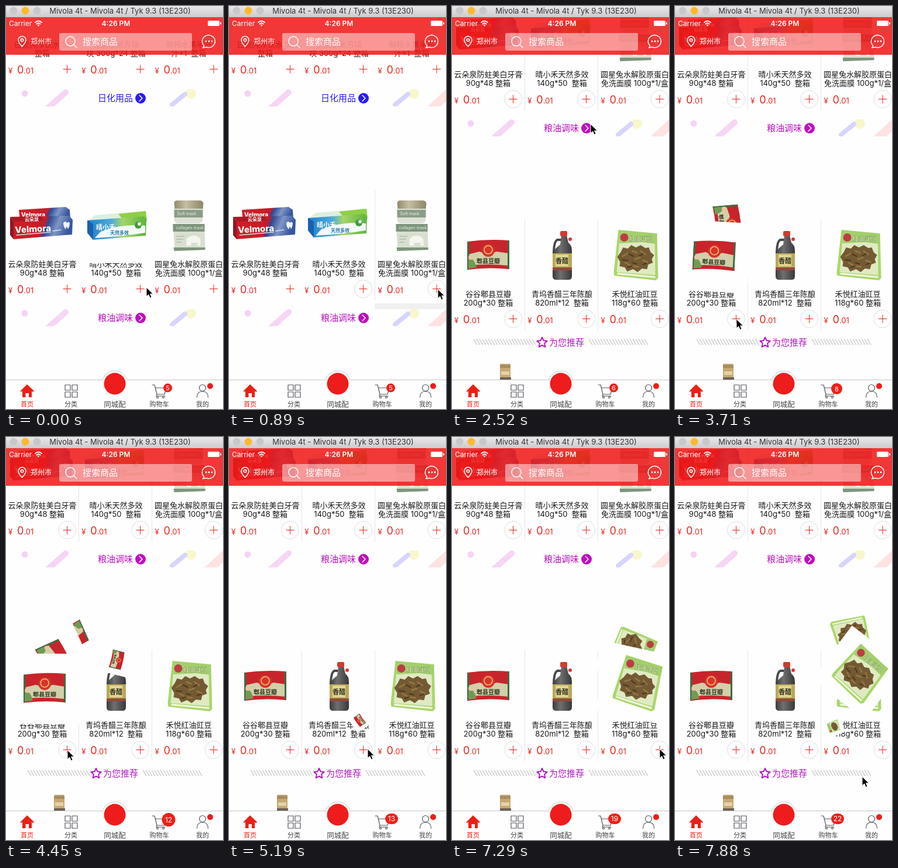
Recreate the animation shown at these times as an HTML page. Size 371 by 686 pixels, loop 8000 ms.

```html
<!DOCTYPE html>
<html lang="zh">
<head>
<meta charset="utf-8">
<title>Shop cart</title>
<style>
html, body { margin: 0; width: 100%; height: 100%; overflow: hidden; background: #fff; }
svg { display: block; width: 371px; height: 686px; }
text { font-family: Inter, "Noto Sans CJK SC", "Noto Sans CJK", sans-serif; white-space: pre; }
.line { fill: none; stroke-linecap: round; stroke-linejoin: round; }
</style>
</head>
<body>
<svg viewBox="0 0 371 686">
  <defs>
    <linearGradient id="bar" x2="0" y2="1"><stop stop-color="#e9e7e9"/><stop offset="1" stop-color="#cdcbcd"/></linearGradient>
    <linearGradient id="paste" x2="1" y2=".15"><stop stop-color="#d01f28"/><stop offset=".58" stop-color="#c41d28"/><stop offset=".64" stop-color="#2c4a94"/><stop offset=".8" stop-color="#7f95c4"/><stop offset="1" stop-color="#37569e"/></linearGradient>
    <linearGradient id="herb" x2="1"><stop stop-color="#1f7fc8"/><stop offset=".4" stop-color="#4aa9dc"/><stop offset=".6" stop-color="#a5d66a"/><stop offset="1" stop-color="#5cb23f"/></linearGradient>
    <linearGradient id="lid" x2="1"><stop stop-color="#8f8a6c"/><stop offset=".4" stop-color="#c4bfa2"/><stop offset="1" stop-color="#8b8667"/></linearGradient>
    <linearGradient id="glass" x2="1"><stop stop-color="#3b3b3d"/><stop offset=".4" stop-color="#706f70"/><stop offset="1" stop-color="#39373a"/></linearGradient>

    <g id="p0">
      <path fill="url(#paste)" d="M-40-27 40-32 47-27 48-12-38-8z"/>
      <text x="-36" y="-15" font-size="10" font-weight="800" fill="#fff">Velmora</text>
      <path fill="#8e1826" d="M-55-15-49-7-49 23-55 16z"/>
      <path fill="url(#paste)" d="M-55-15 46-17 52-10 51 15-49 23-49-7z"/>
      <path fill="#7d1420" d="M-55-15-2-16 2-9-49-7z" opacity=".45"/>
      <text x="-30" y="-8" font-size="8" font-weight="700" fill="#fff">云朵泉</text>
      <text x="-47" y="10" font-size="15" font-weight="800" fill="#fff" transform="rotate(-3)">Velmora</text>
      <path class="line" stroke="#d9deec" stroke-width="1.500" d="M-44 16 14 11M18 9l14-2"/>
      <path fill="#eef4fb" d="M36-5q4-4 6 0 4-3 5 1 0 5-3 10l-2-5-2 5q-4-4-4-11z"/>
    </g>
    <g id="p1">
      <path fill="#dcefe0" d="M-40-22 46-29 48-17-52-12z"/>
      <path fill="#8fcf45" d="M0-24 47-29 49-12 10-12z"/>
      <path fill="url(#herb)" d="M-53-13 44-20 48-15 47 13-43 20-53 8z"/>
      <path fill="#1c60ad" d="M-53-13-43-7-43 20-53 8z"/>
      <path fill="#f4faf6" d="M-30 6Q8-8 46-4L46 8Q10 14-40 17-36 12-30 6z"/>
      <text x="-38" y="3" font-size="11" font-weight="800" fill="#fff">晴小禾</text>
      <text x="-14" y="11" font-size="8" font-weight="700" fill="#2775bb">天然多效</text>
      <circle cx="34" cy="-5" r="6" fill="#3f9b3a"/><circle cx="36" cy="-7" r="3" fill="#e8f6dc"/>
    </g>
    <g id="p2">
      <path fill="url(#lid)" d="M-25-38q0-5 6-5h37q6 0 7 5l-1 9h-48z"/>
      <path fill="#dde1d3" d="M-25-29h49v19q-2 6-8 6h-34q-6 0-7-6z"/>
      <path fill="#8a9d88" d="M-25-27h49v13h-49z"/>
      <text x="-20" y="-18" font-size="7" fill="#eef1e6">Soft mask</text>
      <path fill="#d8dfd0" d="M-27-3h54l1 44-52 2z"/>
      <path fill="#7d957c" d="M-27-3h54v13h-54zM-26 37h54v4l-53 2z"/>
      <text x="-22" y="6" font-size="7" fill="#e8eee0">collagen mask</text>
      <path fill="#f4f6ee" d="M-4 34V23q4-7 14-6 9 1 10 8v9h-5v-5H4v5z"/>
      <path class="line" stroke="#9cab98" d="M-21 18h13M-21 23h11M-21 28h8"/>
    </g>
    <g id="p3">
      <path fill="#c8242c" d="M-36-24Q0-29 35-26L36 23Q0 19-36 24z"/>
      <path fill="#d2cfaa" d="M-35-2-15-7Q0 0 14-7L35-4 35 17Q0 13-35 17z"/>
      <path fill="#3d6d42" d="M-36-24-33-24-32 23-36 24zM33-26 36-26 36 23 33 22z"/>
      <circle cy="-9" r="11" fill="#d6352d"/><circle cy="-10" r="7" fill="none" stroke="#efca6a" stroke-width="1.500"/>
      <text y="13" font-size="10" font-weight="700" text-anchor="middle" fill="#30381f">郫县豆瓣</text>
      <path fill="#6f9b55" d="M-34 6q8-3 12 8l2 6-14 2z"/>
      <circle cx="-30" cy="3" r="4" fill="#e9c4a0"/>
    </g>
    <g id="p4">
      <path class="line" stroke="#4a484a" stroke-width="4" d="M-1-27h-7q-6 3-6 24"/>
      <path fill="url(#glass)" d="M-1-35h9l3 13q6 4 6 14v43q0 6-6 6h-21q-6 0-6-6V-6Q-10-14-3-19z"/>
      <rect x="-3" y="-42" width="12" height="9" rx="2" fill="#d33a31"/>
      <circle cx="14" cy="-28" r="3" fill="#d33a31"/>
      <path fill="#b9a958" d="M-16-4h33v29h-33z"/>
      <path fill="#8f4a3c" d="M-16 20h33v5h-33z"/>
      <path fill="#e2d690" d="M-11-2h22v20h-22z"/>
      <text y="13" font-size="11" font-weight="800" text-anchor="middle" fill="#292a20">香醋</text>
    </g>
    <g id="p5">
      <path fill="#a9d66a" d="M-28-44 38-38 40 38 36 42-35 34-36 28z"/>
      <path fill="#dfeac2" d="M-25-40 34-35 35 33-31 28z"/>
      <path fill="#a3cf6c" d="M-27-43 38-37 37-20 12-23-26-21z"/>
      <circle cx="-18" cy="-31" r="7" fill="#bd3d45"/>
      <text x="-9" y="-25" font-size="10" font-weight="700" fill="#f7f4d4" stroke="#416f2c" stroke-width=".3">红油豇豆</text>
      <path fill="#745a34" d="M-30 2-24-6-20-14-12-12-6-18 2-14 10-18 18-13 24-14 27-6 33-1 29 6 31 12 23 15 21 23 12 22 5 28-3 23-13 27-17 20-26 18-25 11z"/>
      <path class="line" stroke="#95793f" stroke-width="2.500" d="M-21 1l9-5M-4-8l8 3M10-8l8 6M-16 12l8 4M0 6l9-3M14 8l8 3M-2 18l8 1"/>
      <path class="line" stroke="#4a3920" stroke-width="2" d="M-22 7l10 1M-10-3l8 4M8 0l6-3M-4 12l7 2M14 15l6-2M-12 20l6-2"/>
      <path fill="#f3f5df" d="M-29 29 35 35 35 38-31 32z"/>
    </g>
  </defs>

  <rect width="371" height="686" fill="#fefefe"/>
  <g id="content"></g>

  <rect y="19" width="371" height="64" fill="#f01a1a" opacity=".87"/>
  <rect width="371" height="19" fill="url(#bar)"/>
  <circle cx="13" cy="8" r="6.500" fill="#c9c7c9"/><circle cx="33" cy="8" r="6.500" fill="#fdb92c"/><circle cx="53" cy="8" r="6.500" fill="#c9c7c9"/>
  <text x="195" y="13" font-size="13" text-anchor="middle" fill="#363436">Mivola 4t - Mivola 4t / Tyk 9.3 (13E230)</text>
  <g fill="#fff">
    <text x="5" y="33.500" font-size="12">Carrier</text>
    <text x="188" y="33.500" font-size="12" font-weight="600" text-anchor="middle">4:26 PM</text>
    <g class="line" stroke="#fff" stroke-width="1.800"><path d="M50 28q5.500-5 11 0M52.500 30.500q3-3 6 0"/></g>
    <circle cx="55.500" cy="33" r="1.400"/>
    <rect x="345" y="25" width="20" height="9" rx="1.500"/><rect x="366" y="27.500" width="2" height="4" rx="1"/>
    <rect x="91" y="46" width="227" height="30" rx="3" opacity=".48"/>
    <text x="42" y="65" font-size="12">郑州市</text>
    <text x="131" y="66" font-size="15">搜索商品</text>
  </g>
  <g class="line" stroke="#fff" stroke-width="1.500">
    <path d="M27.500 69q-6.500-7-6.500-11a6.500 6.500 0 0 1 13 0q0 4-6.500 11z"/><circle cx="27.500" cy="58" r="2.300"/>
    <circle cx="110" cy="60" r="8"/><path d="m116 66 5 5"/>
    <path d="M338.500 67.500a11 10.500 0 1 1 4 2.500l-6 1q2-1.500 2-3.500z"/>
  </g>
  <g fill="#fff"><circle cx="342" cy="60" r="1.500"/><circle cx="347" cy="60" r="1.500"/><circle cx="352" cy="60" r="1.500"/></g>

  <rect y="637" width="371" height="49" fill="#fefefe"/>
  <circle cx="186" cy="643" r="22" fill="#fefefe" stroke="#ccc"/>
  <rect x="160" y="637" width="52" height="30" fill="#fefefe"/>
  <path d="M0 636.500H165M207 636.500H371" stroke="#c4c4c4"/>
  <circle cx="186" cy="643" r="18.500" fill="#ee1c1c"/>
  <path fill="#ea2015" d="M36 644 48 655.500 46 657 44 655.500V666H39V659H33.500V666H28V655.500L26 657 24.500 655.500z"/>
  <g class="line" stroke="#555560" stroke-width="1.200">
    <path d="M101 645h9v9h-9zM113 645h9v9h-9zM101 657h9v9h-9zM113 657h9v9h-9z"/>
    <path d="M250 645h4l4 16h13l3-11h-18M258 661l-1 3h15"/><circle cx="259" cy="666" r="1.500"/><circle cx="269" cy="666" r="1.500"/>
    <circle cx="336" cy="650" r="5.500"/><path d="M326.500 666q0-10 9.500-10t9.500 10"/>
  </g>
  <circle cx="349" cy="647" r="5" fill="#ee1c1c"/>
  <g id="tabs"></g>
  <g id="badge"><rect fill="#ee2018"/><text y="4" text-anchor="middle" fill="#fff"></text></g>
  <g id="flights"></g>
  <path id="cursor" d="M0 0V15.500L3.700 12.200 6.300 18 9 16.800 6.500 11.200H11.500z" fill="#000" stroke="#fff"/>
</svg>
<script>
const $ = id => document.getElementById(id);
const LOOP = 8000, STEP = 148.5, SCROLL = 323, FLIGHT = 5;
const COLS = [62, 188, 312.5], PLUS = [104.5, 229.5, 355];
const CART = [262, 655];

const text = (x, y, str, size, fill = '#1a1a1a', anchor = 'middle') =>
  `<text x="${x}" y="${y + size * .36}" font-size="${size}" fill="${fill}" text-anchor="${anchor}">${str}</text>`;

// One row of three products, centred on its picture height
function row(y, names, first, cls) {
  return names.map(([a, b], c) => {
    const x = COLS[c], left = c * 125.3, py = y + 109, px = PLUS[c];
    return (first < 0 ? '' : `<use href="#p${first + c}" x="${x}" y="${y}"/>`) +
      text(x, y + 65, a, 13) + text(x, y + 80, b, 13) +
      `<text y="${py + 6}" fill="#e5261e"><tspan x="${left + 4}" font-size="13">¥</tspan><tspan x="${left + 19}" font-size="18">0</tspan><tspan font-size="13">.01</tspan></text>` +
      `<path d="M${px - 7} ${py - 1.5}h14m-7-7v14" stroke="#e5261e" fill="none"/>` +
      (first < 0 ? '' : `<circle class="${cls}${c}" cx="${px}" cy="${py - 1.5}" r="15" fill="none" stroke="#dedede"/>`) +
      (c && first >= 0 ? `<path class="${cls}${c}d" d="M${c * 125 - .5} ${y - 62}v189" stroke="#e6e6e6"/>` : '');
  }).join('');
}

function section(y, name, color) {
  return `<svg y="${y - 15}" width="371" height="29"><g fill="none">
    <circle cx="32" cy="7" r="5.5" fill="#f5d3f5"/>
    <path d="M69 34 102 5" stroke="#f6d5f5" stroke-width="10" stroke-linecap="round"/>
    <circle cx="316" cy="7" r="9" fill="#f8f7cc"/>
    <path d="M284 26 306 8" stroke="#d7d5fd" stroke-width="8" stroke-linecap="round"/>
    <path class="stripe" d="M345 34 379 3" stroke="#ffe2e2" stroke-width="15"/></g></svg>` +
    text(157, y, name, 15, color, 'start') +
    `<circle cx="230" cy="${y}" r="9" fill="${color}"/><path class="line" d="M228 ${y - 5}l5 5-5 5" stroke="#fff" stroke-width="1.5"/>`;
}

function hatch(from, to) {
  let d = '';
  for (let x = from; x < to - 5; x += 5) d += `M${x} 567l6 10`;
  return `<path d="${d}" stroke="#d2d2d2" stroke-width="1.6"/>`;
}

function star(x, y, r) {
  const pts = [...Array(10).keys()].map(i => {
    const a = (i / 5 - .5) * Math.PI, q = i % 2 ? r * .48 : r;
    return `${(x + q * Math.cos(a)).toFixed(1)},${(y + q * Math.sin(a)).toFixed(1)}`;
  });
  return `<polygon class="line" points="${pts.join(' ')}" stroke="#b01cc0" stroke-width="2"/>`;
}

$('content').innerHTML =
  row(-323, [['白瓷纯净饮水 5L', '整箱'], ['香脆小米方块', '块 300g*24 整箱'], ['鲜榨水果半岛', '汁*1  整箱']], -1) +
  section(-166, '日化用品', '#2a1cf0') +
  row(51, [['云朵泉防蛀美白牙膏', '90g*48 整箱'], ['晴小禾天然多效', '140g*50  整箱'], ['圆星兔水解胶原蛋白', '免洗面膜 100g*1/盒']], 0, 'a') +
  '<rect id="band" x="249" y="183" width="121" height="10" fill="#f0f0f0"/>' +
  section(208, '粮油调味', '#bd10be') +
  row(425, [['谷谷郫县豆瓣', '200g*30 整箱'], ['青坞香醋三年陈酿', '820ml*12  整箱'], ['禾悦红油豇豆', '118g*60 整箱']], 3, 'b') +
  hatch(37, 143) + hatch(234, 338) + star(154, 573, 9) +
  text(166, 572.5, '为您推荐', 15, '#b01cc0', 'start') +
  `<rect x="82" y="609" width="18" height="28" rx="2" fill="#c7a873"/><rect x="82" y="611" width="18" height="5" fill="#a58d62"/>
   <rect x="84" y="622" width="14" height="6" fill="#e4d3a8"/><rect x="82" y="632" width="19" height="20" fill="#6b6258"/>`;

$('tabs').innerHTML = [[36, '首页', 11], [111, '分类', 11], [186, '同城配', 12.5], [262, '购物车', 11], [336, '我的', 11]]
  .map(([x, s, size], i) => text(x, 678, s, size, i ? '#444' : '#ea2015')).join('');

// Taps on the plus buttons: [step, column]
const taps = [[0, 1], [7.3, 2], [23.6, 0], [24.8, 0], [26.2, 0], [28, 0], [28.8, 0], [29.95, 0], [30.6, 0],
  [37.15, 1], [40.05, 1], [41.4, 1], [43.8, 2], [47.4, 2], [48.55, 2], [49.2, 2], [50.95, 2], [52.14, 2]];
$('flights').innerHTML = taps.map(([k, c]) =>
  `<g><rect x="-60" y="-60" width="120" height="120" fill="#fefefe"/><use href="#p${c + (k > 12 ? 3 : 0)}"/></g>`).join('');
const flights = [...$('flights').children];

// Pointer stops: [step, x, y]
const stops = [[0, 240, 479], [2, 240, 479], [6, 357, 482], [8, 357, 482], [11, 275, 523], [12, 240, 523],
  [17, 237, 201], [18, 237, 201], [22, 105, 533], [31, 105, 533], [35, 237, 531], [42.3, 237, 531],
  [43.6, 355, 531], [52.2, 355, 531], [53, 320, 578]];

const ease = v => { v = Math.min(1, Math.max(0, v)); return v * v * (3 - 2 * v); };
const bezier = (a, b, c, s) => (1 - s) ** 2 * a + 2 * s * (1 - s) * b + s * s * c;
const show = (el, on) => el.style.display = on ? '' : 'none';
const showAll = (sel, on) => document.querySelectorAll(sel).forEach(el => show(el, on));

function fly(el, [tap, col], k) {
  const age = (k - tap) / FLIGHT, on = age >= 0 && age < 1;
  show(el, on);
  if (!on) return;
  const s = age ** 1.7, x0 = COLS[col] + 4, y0 = (tap > 12 ? 425 : 374) + 4;
  const x = x0 + (CART[0] - x0) * s, y = bezier(y0, y0 - 297, CART[1], s);
  el.setAttribute('transform', `translate(${x} ${y}) rotate(${740 * s}) scale(${1 - .92 * s})`);
}

function drawBadge(k) {
  const done = taps.filter(t => t[0] <= k), n = 4 + done.length;
  const wide = n > 9, pop = k > 0 && k - done[done.length - 1][0] < .3;
  const h = pop ? (wide ? 23 : 19) : wide ? 18 : 15, w = wide ? Math.max(22, h) : h;
  const [box, label] = $('badge').children;
  for (const [key, v] of Object.entries({ x: -w / 2, y: -h / 2, width: w, height: h, rx: h / 2 }))
    box.setAttribute(key, v);
  label.textContent = n;
  label.setAttribute('font-size', wide ? 12 : 11);
  $('badge').setAttribute('transform', `translate(${wide ? 278 : 276.5} ${pop ? 651.5 : 650})`);
}

function draw(k) {
  const scroll = SCROLL * ease((k - 12) / 5);
  $('content').setAttribute('transform', `translate(0 ${SCROLL - scroll})`);
  showAll('.a0, .a1d', k > 12);
  showAll('.a1', k > 0);
  showAll('.a2, .a2d, .stripe', k > 5);
  show($('band'), k > 5 && k < 13);
  flights.forEach((el, i) => fly(el, taps[i], k));
  drawBadge(k);
  let i = 0;
  while (i < stops.length - 2 && stops[i + 1][0] <= k) i++;
  const [k0, x0, y0] = stops[i], [k1, x1, y1] = stops[i + 1], e = ease((k - k0) / (k1 - k0));
  $('cursor').setAttribute('transform', `translate(${x0 + (x1 - x0) * e} ${y0 + (y1 - y0) * e})`);
}

let last = -1;
function tick() {
  const k = Math.min(53, Math.floor((performance.now() % LOOP + 10) / STEP));
  if (k !== last) draw(last = k);
  requestAnimationFrame(tick);
}
tick();
</script>
</body>
</html>
```
